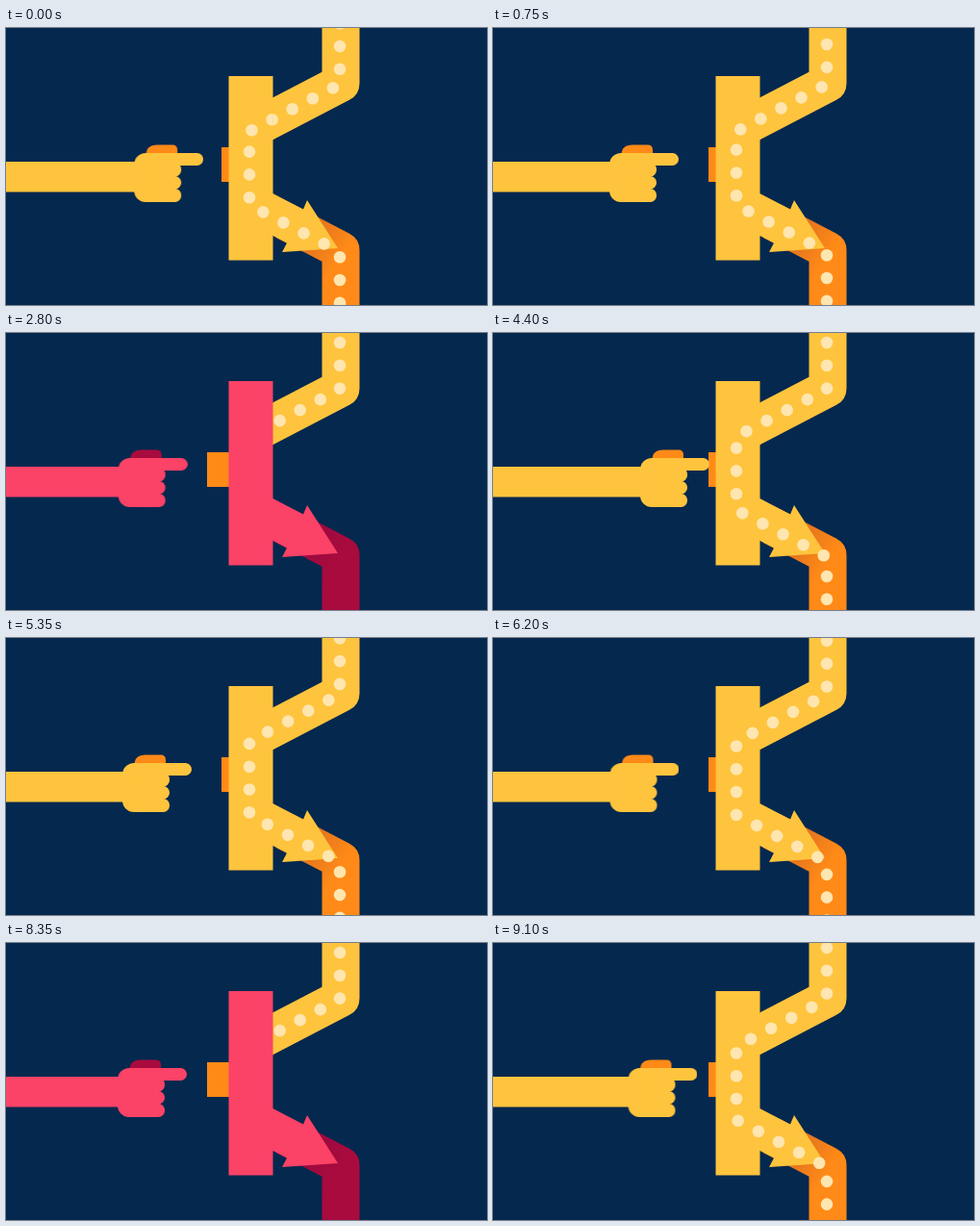
An HTML page without scripts that plays this animation: 500x288 px, repeating every 9150 ms.

```html
<!DOCTYPE html>
<html lang="en">
<head>
<meta charset="utf-8">
<title>Push button flow</title>
<style>
  html, body { margin: 0; width: 100%; height: 100%; overflow: hidden; background: #05284e; }
  svg { display: block; width: 100%; height: 100%; }

  /* One press-on / press-off cycle; it starts as the finger lets go. */
  .tone, .hand, .button, .dots, .live {
    animation: 4575ms linear -115ms infinite;
  }
  .tone { animation-name: tone; animation-timing-function: step-end; }
  .live { animation-name: live; animation-timing-function: step-end; }
  .hand { animation-name: press; }
  .button { animation-name: pop; fill: #ff8a17; }
  .dots { animation-name: flow; }

  .pipe { fill: none; stroke-width: 39; stroke-linejoin: round; }
  .dots {
    fill: none; stroke: #ffe6b0; stroke-width: 12.6;
    stroke-linecap: round; stroke-dasharray: 0 23.8;
  }

  @keyframes tone {
    0%, 98.14% { fill: #ffc43d; color: #ff8a17; }
    47.8% { fill: #fb4267; color: #aa0b3e; }
    100% { fill: #ffc43d; color: #ff8a17; }
  }
  @keyframes live {
    0%, 98.14%, 100% { visibility: visible; }
    47.8% { visibility: hidden; }
  }
  @keyframes press {
    0% { transform: none; animation-timing-function: cubic-bezier(.333, .667, .667, 1); }
    6.56% { transform: translateX(-32px); }
    36.72% { transform: translateX(-32px); animation-timing-function: cubic-bezier(.333, 0, .667, .333); }
    47.54% { transform: none; }
    49.07% { transform: none; animation-timing-function: cubic-bezier(.165, .84, .44, 1); }
    69.2% { transform: translateX(-37px); }
    87.76% { transform: translateX(-37px); animation-timing-function: cubic-bezier(.333, 0, .667, .333); }
    98.47%, 100% { transform: none; }
  }
  @keyframes pop {
    0%, 49.07% { transform: none; }
    51%, 95.8% { transform: translateX(-15px); }
    98.47%, 100% { transform: none; }
  }
  /* 26 dot spacings, then at rest */
  @keyframes flow {
    0% { stroke-dashoffset: 0; }
    47.8%, 100% { stroke-dashoffset: -618.8px; }
  }
</style>
</head>
<body>
<svg viewBox="0 0 500 288" preserveAspectRatio="none">
  <defs>
    <path id="track" d="M347 -37.6V58.6L253 107.6V183.9L347 232.9V310"/>
    <path id="drain" d="M290 200.8L348 231V310"/>
    <linearGradient id="shade" gradientUnits="userSpaceOnUse" x1="322" y1="208" x2="354" y2="228">
      <stop stop-color="#500046" stop-opacity=".16"/>
      <stop offset="1" stop-color="#500046" stop-opacity="0"/>
    </linearGradient>
    <clipPath id="lower"><path d="M0 0H277.5V130H500V288H0Z"/></clipPath>
  </defs>

  <rect width="500" height="288" fill="#05284e"/>
  <path class="pipe" d="M348 -30V57.5L253 107" stroke="#ffc43d"/>
  <use class="dots" href="#track"/>

  <rect class="button" x="224" y="124" width="24" height="36"/>

  <g class="tone">
    <use class="pipe" href="#drain" stroke="currentColor"/>
    <use class="pipe" href="#drain" stroke="url(#shade)"/>
    <path d="M260 163L309 188.500L313 179L345 229L287 233L292 223.500L260 207Z"/>
    <rect x="231.500" y="50" width="46" height="191.500"/>
  </g>

  <g class="live" clip-path="url(#lower)">
    <use class="dots" href="#track"/>
  </g>

  <g class="hand">
    <g class="tone">
      <path d="M165.500 134V132Q165.500 121.500 177 121.500H193Q198 121.500 198 127V134Z" fill="currentColor"/>
      <rect x="-60" y="139" width="230" height="31.500"/>
      <rect x="153" y="130" width="43" height="51" rx="12"/>
      <rect x="168" y="130" width="57" height="13" rx="6.500"/>
      <rect x="172" y="140" width="30" height="14.500" rx="6.500"/>
      <rect x="172" y="154" width="30" height="13.500" rx="6.500"/>
      <rect x="172" y="167" width="30" height="14" rx="6.500"/>
    </g>
  </g>
</svg>
</body>
</html>
```
